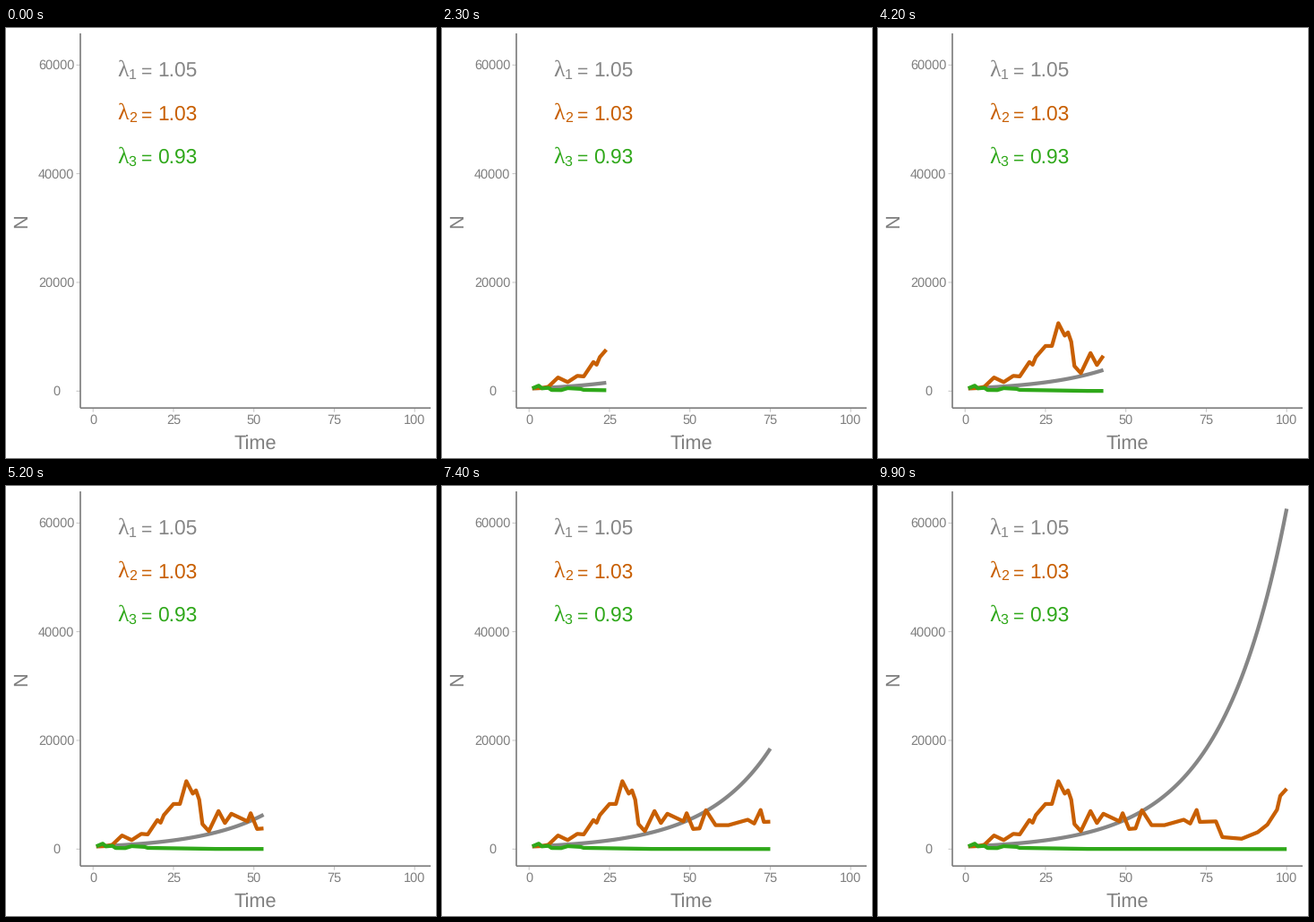
A matplotlib script for the animation above (10 s loop, 480 by 480 pixels).

```python
import numpy as np
import matplotlib.pyplot as plt
from matplotlib.animation import FuncAnimation

SIZE, DPI = 480, 72          # 72 dpi: one point equals one pixel
STEPS, INTERVAL = 100, 100
GREY, ORANGE, GREEN = "#868686", "#c85f02", "#2fa81a"
INK, TICK = "#7f7f7f", "#c4c4c4"
LEFT, BOTTOM = 83, 424.2
ZERO_X, ZERO_Y = 97.2, 405.3
UNIT_X, UNIT_Y = 3.59, 364 / 60000

plt.rcParams["font.family"] = "Liberation Sans"
plt.rcParams["text.hinting"] = "none"
fig = plt.figure(figsize=(SIZE / DPI, SIZE / DPI), dpi=DPI, facecolor="white")
ax = fig.add_axes([0, 0, 1, 1])
ax.set_xlim(0, SIZE)
ax.set_ylim(SIZE, 0)
ax.axis("off")


def px(t):
    return ZERO_X + UNIT_X * t


def py(n):
    return ZERO_Y - UNIT_Y * n


def label(x, y, s, size, color=INK, **kw):
    ax.text(x, y, s, size=size, color=color, va="baseline", **kw)


def rule(xs, ys, color, width):
    ax.plot(xs, ys, color=color, lw=width, solid_capstyle="butt", snap=False)


# Axes
for n in range(0, 60001, 20000):
    rule([LEFT - 4.5, LEFT], [py(n)] * 2, TICK, 1)
    label(56.2, py(n) + 5, str(n), 14.5, ha="center")
for t in range(0, 101, 25):
    rule([px(t)] * 2, [BOTTOM, BOTTOM + 4.5], TICK, 1)
    label(px(t), 442, str(t), 14.5, ha="center")
rule([LEFT, LEFT], [6, BOTTOM], INK, 1.7)
rule([LEFT, 474], [BOTTOM, BOTTOM], INK, 1.7)
label(278.5, 471, "Time", 21.8, ha="center")
label(23.5, 215, "N", 21.8, ha="center", rotation=90, rotation_mode="anchor")

# Growth rates
rates = [(1.05, GREY), (1.03, ORANGE), (0.93, GREEN)]
for i, (rate, color) in enumerate(rates):
    y = 54 + 48.4 * i
    label(130.3, y, "λ", 26, color, ha="center", family="Liberation Serif")
    label(136.8, y + 3, str(i + 1), 16, color)
    label(157.2, y + 0.8, "=", 21, color, ha="center")
    label(169, y, f"{rate:.2f}", 22.7, color)

# Populations: a steady growth curve and two noisy ones,
# the latter joined through their turning points (time, thousands)
time = np.arange(1, STEPS + 1)


def through(points):
    t, n = zip(*points)
    return 1000 * np.interp(time, t, n)


steady = 500 * 1.05 ** (time - 1)
wild = through([
    (1, .5), (4, .55), (6, .8), (9, 2.5), (12, 1.65), (15, 2.8), (17, 2.7),
    (20, 5.35), (21, 4.85), (22, 6.25), (25, 8.3), (27, 8.3), (29, 12.5),
    (31, 10.2), (32, 10.8), (33, 9.1), (34, 4.6), (36, 3.3), (39, 7),
    (41, 4.8), (43, 6.5), (48, 5.1), (49, 6.6), (51, 3.7), (53, 3.8),
    (55, 7.15), (58, 4.4), (62, 4.4), (68, 5.4), (70, 4.7), (72, 7.2),
    (73, 5), (78, 5.1), (80, 2.2), (86, 1.9), (91, 3.1), (94, 4.5),
    (97, 7.25), (98, 9.8), (100, 11.1)])
fading = through([(1, .5), (3, 1), (4, .5), (6, .6), (7, .2), (10, .18),
                  (12, .54), (16, .4), (17, .22), (38, .03), (100, 0)])

series = [py(n) for n in (steady, wild, fading)]
lines = [ax.plot([], [], color=c, lw=4.25, solid_capstyle="butt",
                 solid_joinstyle="round")[0] for _, c in rates]


def draw(step):
    shown = step + 1 if step else 0
    for line, ys in zip(lines, series):
        line.set_data(px(time[:shown]), ys[:shown])
    return lines


anim = FuncAnimation(fig, draw, frames=STEPS, interval=INTERVAL,
                     repeat=True, repeat_delay=0)
plt.show()
```
